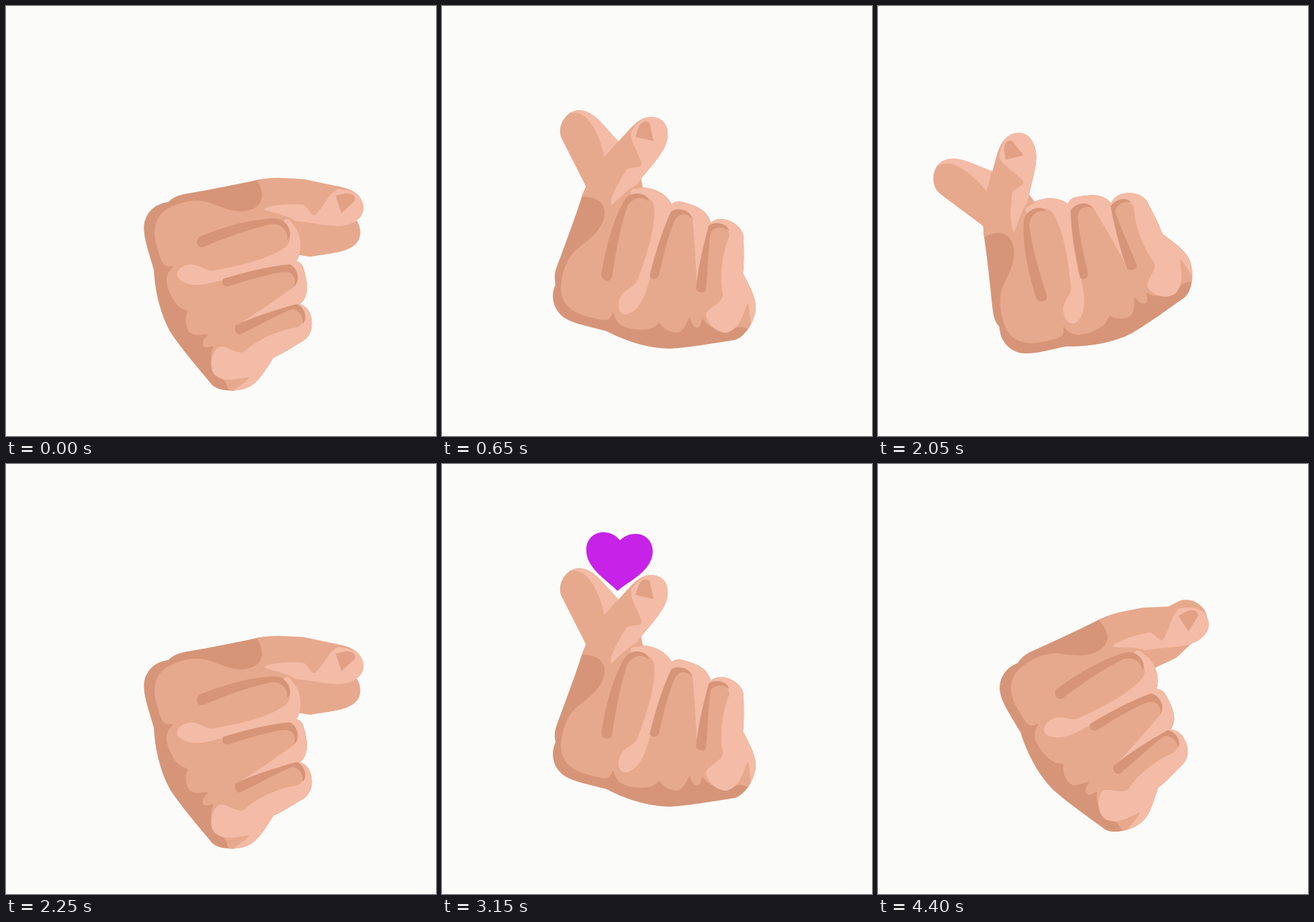
Animation, 640 px wide and 640 px high, one loop 4.45 s. Source, as an HTML page:

```html
<!DOCTYPE html>
<html lang="en">
<head>
<meta charset="utf-8">
<title>Finger heart</title>
<style>
  html, body { margin: 0; width: 100%; height: 100%; overflow: hidden; background: #fbfbf9; }
  svg { display: block; width: 100%; height: 100%; }
  .mid { fill: #e7a98d; }
  .dark { fill: #d69578; }
  .light { fill: #f4bba6; }
  .nail { fill: #e2a187; }
</style>
</head>
<body>
<svg viewBox="0 0 640 640">
  <defs>
    <path id="fist" d="M209 281C200 310 185 350 172 385C167 398 167 405 169 414C162 430 164 447 177 460C190 472 215 476 245 484C275 500 310 510 340 510C370 508 410 501 436 497C451 493 467 468 467 447C466 430 455 412 448 398C450 380 449 360 449 345C448 330 432 318 416 317C408 317 403 320 400 323C396 305 380 297 355 291C350 290 345 292 342 295C334 280 318 271 298 270L255 255L216 267Z"/>
    <clipPath id="inside"><use href="#fist"/></clipPath>
  </defs>
  <path id="heart" fill="#c622e8" d="M0 62C-20 42 -63 22 -63 -15C-63 -35 -48 -48 -31 -48C-17 -48 -7 -42 0 -34C7 -42 17 -48 31 -48C48 -48 63 -35 63 -15C63 22 20 42 0 62Z"/>
  <g id="hand">
    <g id="thumb">
      <path class="mid" d="M213 266L178 197C170 180 184 156 203 155C222 155 238 175 262 201L285 250L270 300L225 300Z"/>
      <path id="shine" class="light" d="M190 159C208 150 222 158 235 171L262 201L242 226C238 205 228 178 212 164C205 159 198 158 190 159Z"/>
    </g>
    <use href="#fist" class="dark"/>
    <g clip-path="url(#inside)">
      <path class="mid" d="M200 240L206 284C225 283 240 289 242 305C243 330 222 345 203 360C187 373 178 395 177 420C177 440 190 454 212 461C228 465 240 469 246 467C252 465 252 459 255 456C257 464 260 472 270 477C285 483 305 483 313 479C319 476 321 472 324 472C328 479 338 486 350 486C361 484 364 470 369 463C371 471 373 478 380 479C387 477 384 468 389 466C394 478 420 489 437 479C442 476 450 479 456 480L480 440L460 260Z"/>
      <path class="light" d="M280 269C300 263 330 270 346 296C335 330 325 375 308 410C301 440 289 455 275 459C262 460 260 445 266 432C275 418 288 420 292 405C305 370 318 330 316 300C314 285 300 278 281 283Z"/>
      <path class="dark" d="M308 291C306 277 282 275 273 287C258 310 245 350 237 400C238 410 250 412 253 404C258 370 265 330 276 298C284 285 298 282 308 291Z"/>
      <path class="light" d="M342 295C350 286 365 290 386 296C396 302 399 312 402 323C392 350 384 385 379 412C378 385 376 350 373 318C370 303 352 300 341 306Z"/>
      <path class="dark" d="M373 318C370 302 349 299 341 306C327 335 317 370 309 402C313 409 321 407 323 400C330 370 337 340 347 318C354 307 366 308 373 318Z"/>
      <path class="light" d="M398 326C403 316 420 310 442 324L454 345L450 400L472 447L461 476C458 475 460 455 455 443C448 455 447 478 425 486C408 488 392 470 393 458C398 447 418 442 418 430C412 400 418 365 428 342C425 326 408 322 398 330Z"/>
      <path class="dark" d="M427 335C425 322 404 320 397 327C388 360 380 395 378 422C383 428 392 428 393 422C396 390 396 360 400 336C407 328 420 328 427 335Z"/>
    </g>
    <path class="mid" d="M278 273L296 255L299 271Z"/>
    <path class="mid" d="M209 282C215 262 228 245 242 224L275 188C285 177 295 166 310 165C336 165 342 191 330 213C318 234 300 250 290 266C276 282 262 290 251 297C244 290 225 283 209 282Z"/>
    <path class="light" d="M251 297C250 285 262 263 275 243C284 238 297 243 297 235C292 215 281 205 281 187C291 173 300 165 312 165C336 166 342 190 330 213C318 234 300 250 290 266C275 272 262 290 251 297Z"/>
    <path class="nail" d="M288 195L293 179Q301 167 309 174L315 201Z"/>
  </g>
</svg>
<script>
  const LOOP = 4450, STEP = 50;
  const PINCH = 59.3, WIND_UP = -32, THUMB_SWING = 65;
  const el = id => document.getElementById(id);
  const heart = el('heart'), hand = el('hand'), thumb = el('thumb'), shine = el('shine');

  const ramp = (t, a, b) => Math.min(1, Math.max(0, (t - a) / (b - a)));
  const smooth = u => u * u * (3 - 2 * u);

  // Times of each cycle: hand turns up, heart grows, heart folds, hand turns back
  const cycles = [
    { up: 520, grow: 700, fold: 1900, back: 1940, end: 2250 },
    { up: 2700, grow: 2875, fold: 4040, back: 4130, end: LOOP }
  ];

  function pose(t) {
    const c = t < cycles[0].end ? cycles[0] : cycles[1];
    const up = ramp(t, c.up, c.up + 130);
    const wind = smooth(ramp(t, c.back, c.back + 150));
    const down = ramp(t, c.back + 150, c.back + 310);
    const pinch = up < 1 ? 1 - smooth(up) : smooth(down);
    const tilt = WIND_UP * wind;
    return {
      pinch,
      angle: up < 1 ? PINCH * pinch : tilt + (PINCH - tilt) * pinch,
      thumb: up < 1 ? 1 - up : down ** 1.3,
      lift: Math.sin(Math.PI * down),
      size: ramp(t, c.grow, c.grow + 350),
      fold: 1 - ramp(t, c.fold, c.fold + 70)
    };
  }

  function draw(t) {
    const p = pose(t);
    const dx = -3 * p.pinch - 7.2 * p.lift;
    const dy = -3.5 * p.pinch - 23 * p.lift;
    hand.setAttribute('transform', `translate(${dx} ${dy}) rotate(${p.angle} 311 421)`);
    thumb.setAttribute('transform', `rotate(${THUMB_SWING * p.thumb} 247 304)`);
    shine.setAttribute('visibility', p.thumb > 0.5 ? 'hidden' : 'inherit');
    heart.setAttribute('visibility', p.size * p.fold > 0 ? 'visible' : 'hidden');
    heart.setAttribute('transform',
      `translate(262 237) scale(${p.size}) translate(2 -123) rotate(3) scale(1 ${p.fold})`);
  }

  const start = performance.now();
  function tick() {
    const t = (performance.now() - start) % LOOP;
    draw(Math.floor(t / STEP) * STEP);
    requestAnimationFrame(tick);
  }
  tick();
</script>
</body>
</html>
```
